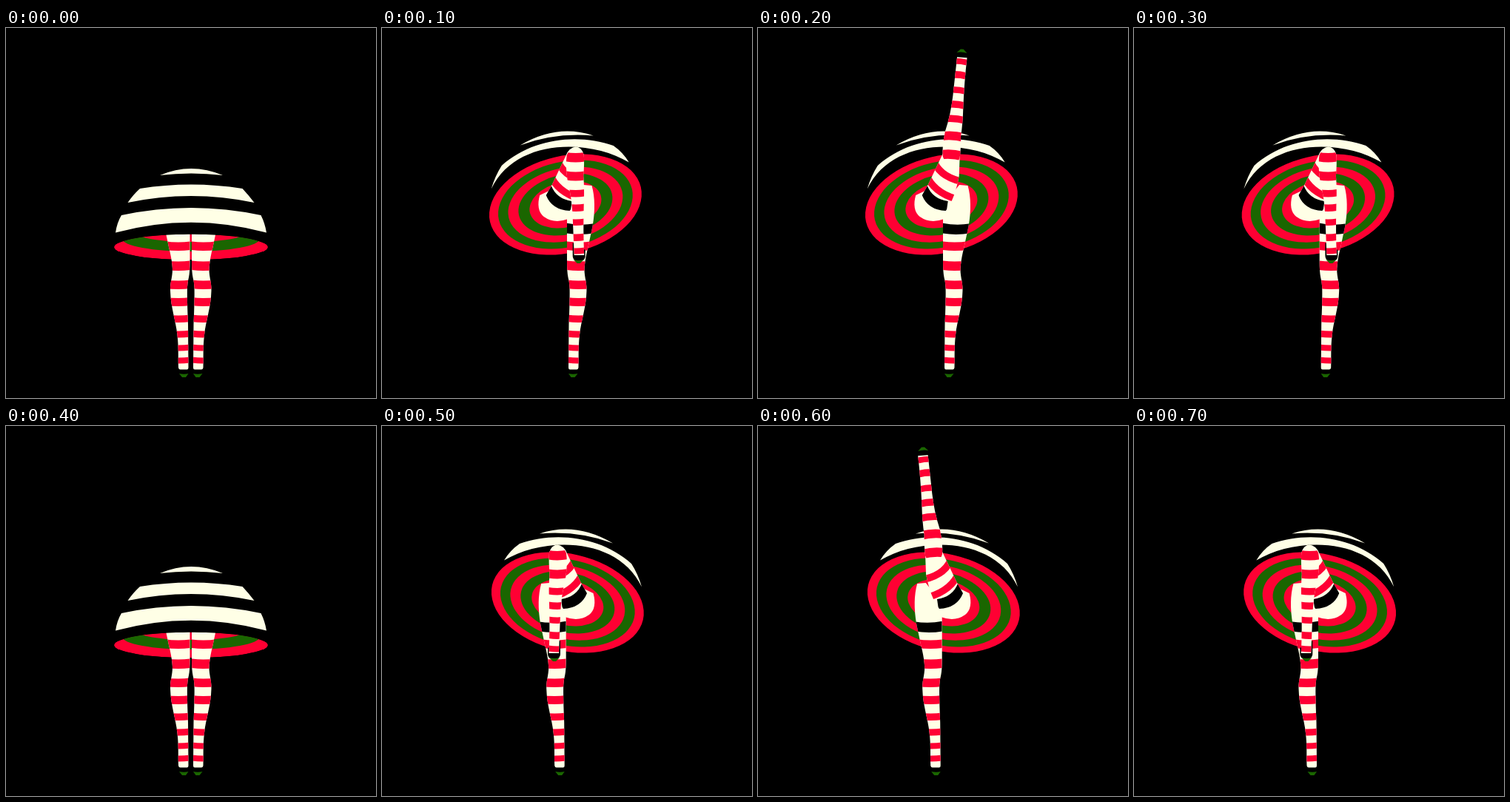
An HTML page that plays this animation: 500 px wide and 500 px high, repeating every 0.8 s.

```html
<!DOCTYPE html>
<html lang="en">
<head>
<meta charset="utf-8">
<title>Cancan</title>
<style>
  html, body { margin: 0; width: 100%; height: 100%; overflow: hidden; background: #000; }
  svg { display: block; width: 100%; height: 100%; }
  .cream { fill: #ffffe6; }
  .red { fill: #ff0033; }
  .green { fill: #1a6600; }
  .band { fill: none; stroke: #ff0033; stroke-width: 9.500; }
</style>
</head>
<body>
<svg viewBox="0 0 500 500">
  <defs>
    <path id="legShape" d="M251 240 L273 212 L284.500 213 Q291 236 285.500 268 L279.500 296 Q276 310 275 320 C273 334 278 342 277.500 355 C277 378 270 395 268 415 C266 432 267 445 266.500 459 Q266 461.500 264 461.500 H255 Q253 461.500 253 459 L253.500 400 Q255 365 254.500 350 Q254 342 252.500 337 Q251 330 251 315 Z"/>
    <path id="thighShape" d="M262 162 Q253 161 249 172 L230 212 L222 226 Q230 246 254 247 Q266 232 272 200 L273 172 Q271 162 262 162 Z"/>
    <path id="shinShape" d="M262 160.500 Q254 161 250 172 Q248 186 251 206 Q257 230 258 255 L260 307 H273.500 Q272 275 273 240 Q274 218 272.500 200 Q274 182 273 171 Q270 160.500 262 160.500 Z"/>
    <clipPath id="legClip"><use href="#legShape"/></clipPath>
    <clipPath id="thighClip"><use href="#thighShape"/></clipPath>
    <clipPath id="shinClip"><use href="#shinShape"/></clipPath>
    <clipPath id="rimClip"><ellipse cx="250" cy="296" rx="104" ry="17.300"/></clipPath>

    <g id="leg">
      <use href="#legShape" class="cream"/>
      <g clip-path="url(#legClip)">
        <path d="M248 263 Q268 268 290 264 V277 Q268 281 248 277 Z"/>
        <g id="legBands"></g>
      </g>
      <path class="green" d="M253 467 Q259 468.500 265.500 467 L261.500 472 H256.500 Z"/>
    </g>

    <g id="shin">
      <path d="M258 290 V308 Q258 313 263 315 H270 Q275 313 275 308 V300 Z"/>
      <use href="#shinShape" class="cream"/>
      <g id="shinBands" clip-path="url(#shinClip)"></g>
      <path class="green" d="M259 313 Q266 315 273 313 L268 318 H264 Z"/>
    </g>
  </defs>

  <g id="rest">
    <g clip-path="url(#rimClip)">
      <ellipse class="red" cx="250" cy="296" rx="104" ry="17.300"/>
      <ellipse class="green" cx="250" cy="285" rx="93" ry="17"/>
      <ellipse class="red" cx="250" cy="279" rx="69" ry="10"/>
    </g>
    <use href="#leg"/>
    <use href="#leg" transform="translate(499.500) scale(-1 1)"/>
    <path d="M146 296 A104 17.300 0 0 1 354 296 Q345 190 250 188 Q155 190 146 296 Z"/>
    <g class="cream">
      <path d="M208 199 Q250 181 293 199 Q250 194 208 199 Z"/>
      <path d="M181 217 Q250 206 319.500 217 Q328 226 335.500 236 Q250 218 164.500 236 Q172 225 181 217 Z"/>
      <path d="M156 253 Q250 233 344.500 253 Q350 264 352 276.500 Q250 249 148 276.500 Q150 263 156 253 Z"/>
    </g>
  </g>

  <g id="kick">
    <g class="cream">
      <path d="M187 158.500 Q237 129 286 145.500 Q234 141 187 158.500 Z"/>
      <path d="M148 217.500 Q153 200 162 186 C203 149 265 142 313 159 Q326 168 334 181.500 C280 149 180 149 148 217.500 Z"/>
    </g>
    <g id="rings" transform="translate(248.200 238.500) rotate(-13)"></g>
    <path class="cream" d="M226 220 L213.500 226 Q208 246 219 255 Q233 265 252 258 V235 Z"/>
    <use href="#leg" transform="translate(-.7)"/>
    <use href="#thighShape" class="cream"/>
    <g clip-path="url(#thighClip)">
      <path class="band" d="M237 177 Q244 200 274 207"/>
      <path class="band" d="M227 197 Q237 222 268 231"/>
      <path d="M229 213 Q236 231 257 234 L255 248 H220 V228 Z"/>
    </g>
    <use href="#shin" id="lower"/>
  </g>
</svg>
<script>
  const $ = id => document.getElementById(id);

  // rows: [top, height]
  const bands = (id, left, right, bend, rows) => {
    const mid = (left + right) / 2;
    $(id).innerHTML = rows.map(([y, h]) =>
      `<path class="red" d="M${left} ${y} Q${mid} ${y + bend} ${right} ${y} V${y + h} Q${mid} ${y + h + bend} ${left} ${y + h} Z"/>`
    ).join('');
  };

  bands('legBands', 247, 286, 3, [
    [288, 11.5], [314, 12.5], [340, 11.5], [363.5, 11],
    [387, 9.5], [408, 9], [427, 8], [444, 8]
  ]);
  bands('shinBands', 247, 277, 3, [
    [167.5, 12.5], [193, 12], [217.5, 9.5], [237, 9.5],
    [257, 8.5], [277, 9.5], [296, 8]
  ]);

  const tones = ['red', 'green', 'red', 'green', 'red'];
  $('rings').innerHTML = [1, .883, .752, .617, .471].map((k, i) =>
    `<ellipse class="${tones[i]}" rx="${104.6 * k}" ry="${65.5 * k}"/>`
  ).join('');

  const STEP = 100;
  const RIGHT = 'translate(-.3)', RIGHT_BACK = 'translate(.4)';
  const LEFT = 'translate(499) scale(-1 1)', LEFT_BACK = 'translate(499.300) scale(-1 1)';
  const BENT = 'translate(0)';
  const HIGH = 'rotate(4 262 173) translate(0 346) scale(1 -1)';
  const poses = [
    null, [RIGHT, BENT], [RIGHT, HIGH], [RIGHT_BACK, BENT],
    null, [LEFT, BENT], [LEFT, HIGH], [LEFT_BACK, BENT]
  ];

  const draw = now => {
    const pose = poses[Math.floor(now / STEP) % poses.length];
    $('rest').style.display = pose ? 'none' : '';
    $('kick').style.display = pose ? '' : 'none';
    if (pose) {
      $('kick').setAttribute('transform', pose[0]);
      $('lower').setAttribute('transform', pose[1]);
    }
  };

  const start = performance.now();
  const tick = () => {
    draw(performance.now() - start);
    requestAnimationFrame(tick);
  };
  tick();
</script>
</body>
</html>
```
